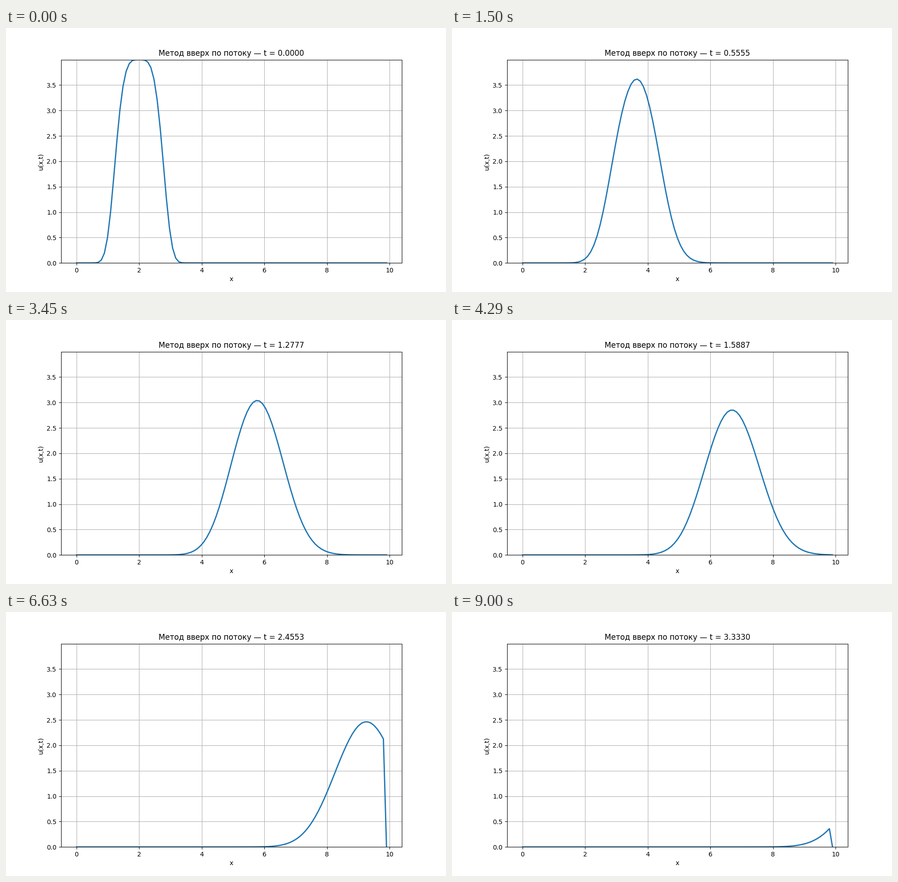
A matplotlib script for the animation above (9030 ms loop, 966x580 px).

```python
import numpy as np
import matplotlib.pyplot as plt
from matplotlib.animation import FuncAnimation

SPEED, DX, COURANT = 3, 0.1, 1e-4
SUBSTEPS, FRAMES = 3333, 301
FRAME_DT = SUBSTEPS * COURANT * DX / SPEED

x = np.linspace(0, 9.9, 101)
u0 = 4 * np.exp(-2 * (x - 2) ** 4)


def upwind_matrix(n):
    """One explicit upwind step; both end nodes stay fixed."""
    a = np.eye(n)
    inner = np.arange(1, n - 1)
    a[inner, inner] = 1 - COURANT
    a[inner, inner - 1] = COURANT
    return a


advance = np.linalg.matrix_power(upwind_matrix(len(x)), SUBSTEPS)
states = [u0]
for _ in range(FRAMES - 1):
    states.append(advance @ states[-1])

plt.rcParams["font.family"] = "DejaVu Sans"
fig, ax = plt.subplots(figsize=(9.66, 5.8), dpi=100)
line, = ax.plot(x, u0, lw=2)
ax.set_ylim(0, u0.max())
ax.set_xlabel("x")
ax.set_ylabel("u(x,t)")
ax.grid(True)
title = ax.set_title("")


def update(i):
    line.set_ydata(states[i])
    # The tiny offset makes ties round up
    title.set_text(f"Метод вверх по потоку — t = {i * FRAME_DT + 1e-9:.4f}")
    return line, title


anim = FuncAnimation(fig, update, frames=FRAMES, interval=30,
                     repeat=True, repeat_delay=0)
plt.show()
```
